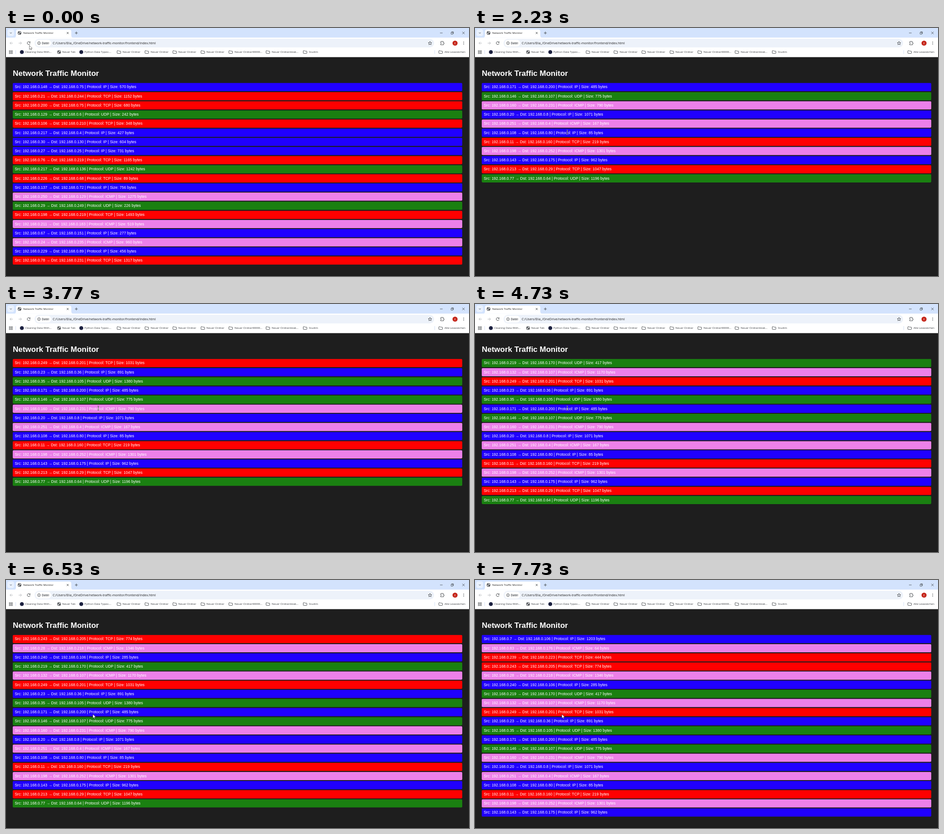
Recreate the animation shown at these times as an HTML page. Size 1021 by 549 pixels, loop 8 s.

```html
<!DOCTYPE html>
<html lang="de">
<head>
<meta charset="utf-8">
<title>Network Traffic Monitor</title>
<style>
html, body { margin: 0; width: 100%; height: 100%; overflow: hidden; background: #1e1e1e; }
#stage { position: relative; width: 1021px; height: 549px; overflow: hidden; background: #1e1e1e; }
#stage > svg { position: absolute; left: 0; top: 0; }
#page {
  position: absolute; left: 0; top: 0; width: 1920px; height: 1033px;
  transform: scale(.53177); transform-origin: 0 0;
  font: 16px/18px "Liberation Sans", Arial, sans-serif; color: #fff;
}
h1 { position: absolute; left: 28px; top: 169.5px; margin: 0; font-size: 32px; line-height: 37px; white-space: nowrap; }
#list { position: absolute; left: 28px; top: 229.4px; width: 1864px; }
#list div { height: 18px; padding: 8px; margin-bottom: 4px; border-radius: 4px; white-space: pre; }
.IP { background: #2000ff; }
.TCP { background: #f00; }
.UDP { background: #1a8011; }
.ICMP { background: #ec80e9; }
#edge { position: absolute; left: 0; top: 547px; width: 100%; height: 2px; background: #181818; }
#ui { font: 6.05px "Open Sans", "Noto Sans", sans-serif; }
#ui text { fill: #3c3f43; white-space: pre; }
.line { fill: none; stroke: #3c4043; stroke-width: .9; }
#beam { mix-blend-mode: difference; }
</style>
</head>
<body>
<div id="stage">
  <div id="page">
    <h1>Network Traffic Monitor</h1>
    <div id="list"></div>
  </div>
  <div id="edge"></div>

  <svg id="ui" width="1021" height="549" viewBox="0 0 1021 549">
    <defs>
      <g id="folder" class="line"><path d="M.5-2.2q0-.8.8-.8H3.4l1 1H7.700q.8 0 .8.8V2.300q0 .8-.8.8H1.300q-.8 0-.8-.8Z"/></g>
      <g id="globe">
        <circle r="4" fill="#4a4d51"/>
        <path d="M-3-.8Q-1.500-.7-1 .5T.5 1.500V3Q-2.700 3-3-.8M-.5-3Q2.500-3.200 3-.3 1.500.2.800-.8T-.8-1.500Z" fill="#fff"/>
      </g>
    </defs>

    <!-- tab strip -->
    <path d="M0 0H1021V22H0Z" fill="#d3e3fd"/>
    <rect x="3" y="3" width="15" height="15" rx="4.500" fill="#e9f1fe"/>
    <path class="line" d="M8.700 10l2 2 2-2"/>
    <path d="M17 21.500q5 0 5-5V8q0-4.500 4.500-4.500h113q4.500 0 4.500 4.500v8.500q0 5 5 5Z" fill="#fff"/>
    <use href="#globe" x="29.800" y="11"/>
    <text x="38" y="13.200" style="font-size:6px;fill:#1f1f1f">Network Traffic Monitor</text>
    <path class="line" d="M134 9l4.200 4.200M138.200 9L134 13.200M152 11h6.200M155.100 7.900v6.200"/>
    <path class="line" d="M957 11h5.800M1006.200 8.300l5.200 5.200M1011.400 8.300l-5.200 5.200" style="stroke-width:.8"/>
    <path class="line" d="M981.500 9.700h3.900v3.900h-3.900ZM982.800 9.500V8.400h3.900v3.900h-1.100" style="stroke-width:.8"/>

    <!-- toolbar -->
    <path d="M0 21.300H1021V64.500H0Z" fill="#fff"/>
    <g class="line">
      <path d="M15.200 33.500H8.800M11.800 30.400l-3.100 3.100 3.100 3.100M27.800 33.500h6.400M31.200 30.400l3.100 3.100-3.100 3.100" stroke="#b4b7ba" style="stroke:#b4b7ba"/>
      <path d="M52.800 31.700A3.200 3.200 0 1 0 53.200 34.200M53.200 29.900v2.300h-2.300" style="stroke-width:1"/>
    </g>
    <rect x="63" y="24" width="881" height="19" rx="9.500" fill="#edf2fa"/>
    <rect x="65.500" y="26" width="34" height="15" rx="7.500" fill="#fff"/>
    <circle class="line" cx="72.700" cy="33.500" r="3.100"/>
    <path class="line" d="M72.700 33.200v2M72.700 31.500v.8"/>
    <text x="79" y="35.700" style="font-size:6.200px;font-weight:600">Datei</text>
    <text x="103" y="36" style="font-size:7.050px;fill:#1f1f1f">C:/Users/Elia_/OneDrive/network-traffic-monitor/frontend/index.html</text>
    <path class="line" d="M935 29.700l1.100 2.600 2.800.2-2.100 1.900.6 2.700-2.400-1.500-2.400 1.500.6-2.700-2.100-1.900 2.800-.2Z"/>
    <path class="line" d="M958.500 30.500h2q-.2-1.500 1-1.500t1 1.500h2.400v2.400q1.500-.2 1.500 1t-1.500 1v2.300h-6.400v-2.200q1.500-.2 1.500-1.200t-1.500-1.200Z"/>
    <circle cx="990.200" cy="33.500" r="5.600" fill="#c5271c"/>
    <text x="990.200" y="35.500" text-anchor="middle" style="font-size:5.400px;fill:#fff">E</text>
    <g fill="#3c4043"><circle cx="1009.300" cy="30.700" r=".8"/><circle cx="1009.300" cy="33.500" r=".8"/><circle cx="1009.300" cy="36.300" r=".8"/></g>

    <!-- bookmarks -->
    <path class="line" d="M7.200 50h2.600v2.600H7.200ZM11.600 50h2.600v2.600h-2.600ZM7.200 54.200h2.600v2.600H7.200ZM11.600 54.200h2.600v2.600h-2.600Z" style="stroke-width:.8"/>
    <path d="M21.300 49v8.500M945.500 49v8.500" stroke="#c7d7f2" stroke-width=".8"/>
    <g id="marks"></g>
  </svg>

  <svg id="beam" width="1021" height="549" viewBox="0 0 1021 549">
    <path d="M-1.700-4.500H-.5L0-4.200.5-4.500H1.700M0-4.200V4.200M-1.700 4.500H-.5L0 4.200.5 4.500H1.700" fill="none" stroke="#ddd" stroke-width=".75"/>
  </svg>
  <svg id="arrow" width="1021" height="549" viewBox="0 0 1021 549">
    <path d="M0 0V9L2.100 7.100 3.500 10.200 4.900 9.600 3.500 6.600H6.400Z" fill="#fff" stroke="#111" stroke-width=".55"/>
  </svg>
</div>

<script>
const $ = id => document.getElementById(id);
const LOOP = 8000, MAX_ROWS = 20;

// icon, icon x, text x, label
const marks = [
  ['dot', 35, 42, 'Cleaning Data With...'],
  ['globe', 117, 124, 'Neuer Tab'],
  ['dot', 166, 173, 'Python Data Types:...'],
  ['folder', 244.5, 257, 'Neuer Ordner'],
  ['folder', 306, 319, 'Neuer Ordner'],
  ['folder', 367.5, 380, 'Neuer Ordner'],
  ['folder', 429.5, 442, 'Neuer Ordner'],
  ['folder', 491, 504, 'Neuer Ordnerlllllllllll...'],
  ['folder', 573, 586, 'Neuer Ordnerdslak...'],
  ['folder', 655, 668, 'Studim'],
  ['folder', 954, 967, 'Alle Lesezeichen']
];
$('marks').innerHTML = marks.map(([icon, x, tx, label]) =>
  (icon === 'dot'
    ? `<circle cx="${x}" cy="53.2" r="4.3" fill="#1c2140"/>`
    : `<use href="#${icon}" x="${x}" y="53.2"/>`) +
  `<text x="${tx}" y="55.4">${label}</text>`).join('');

// packets as "src dst protocol size"
const parse = s => s.split(',').map(p => {
  const [src, dst, proto, size] = p.trim().split(' ');
  return `<div class="${proto}">Src: 192.168.0.${src} → Dst: 192.168.0.${dst} | Protocol: ${proto} | Size: ${size} bytes</div>`;
});

// newest first
const before = parse(`148 75 IP 570, 21 244 TCP 1152, 200 75 TCP 680, 129 6 UDP 242,
  106 210 TCP 348, 217 4 IP 427, 30 130 IP 604, 27 25 IP 731, 76 219 TCP 1165,
  217 136 UDP 1242, 226 68 TCP 89, 137 72 IP 756, 250 129 ICMP 1275, 29 249 UDP 226,
  198 219 TCP 1493, 211 183 ICMP 519, 67 151 IP 277, 24 235 ICMP 960, 229 89 IP 456,
  78 231 TCP 1317`);
const after = parse(`7 106 IP 1203, 83 176 ICMP 64, 239 223 TCP 444, 243 205 TCP 774,
  28 218 ICMP 1346, 240 106 IP 285, 219 170 UDP 417, 132 107 ICMP 1170, 249 201 TCP 1031,
  23 36 IP 891, 35 105 UDP 1380, 171 200 IP 485, 146 107 UDP 775, 160 231 ICMP 790,
  20 8 IP 1071, 251 4 ICMP 167, 108 80 IP 85, 11 160 TCP 219, 198 252 ICMP 1301,
  143 175 IP 962, 213 29 TCP 1047, 77 64 UDP 1196`);

const CLEAR = 700, RECONNECT = 830, BACKLOG = 8;
const arrivals = [1230, 1730, 2230, 2700, 3200, 3770, 4230, 4730, 5230, 5730, 6230, 6770, 7270, 7730];

// -1 stands for the list before the reload
function rowCount(t) {
  if (t < CLEAR) return -1;
  if (t < RECONNECT) return 0;
  return BACKLOG + arrivals.filter(a => a <= t).length;
}

// time, x, y
const path = [
  [0, 51.5, 38.5], [30, 51.5, 38.5], [200, 47, 35], [730, 47, 35], [1170, 174, 238.7],
  [1500, 196, 236], [1970, 203.5, 230.5], [5130, 203.5, 230.5], [5930, 197, 270],
  [6500, 191.5, 297], [LOOP, 191.5, 297]
];

function pointer(t) {
  const i = path.findIndex(p => p[0] > t);
  const [t0, x0, y0] = path[i - 1], [t1, x1, y1] = path[i];
  const k = (t - t0) / (t1 - t0), e = k * k * (3 - 2 * k);
  return [x0 + (x1 - x0) * e, y0 + (y1 - y0) * e];
}

let shown;
function draw(t) {
  const n = rowCount(t);
  if (n !== shown) {
    shown = n;
    const rows = n < 0 ? before : after.slice(after.length - n);
    $('list').innerHTML = rows.slice(0, MAX_ROWS).join('');
  }
  const [x, y] = pointer(t), overText = t > 1000 && t < 6000;
  for (const id of ['beam', 'arrow']) {
    $(id).style.visibility = (id === 'beam') === overText ? 'visible' : 'hidden';
    $(id).firstElementChild.setAttribute('transform', `translate(${x} ${y})`);
  }
}

const start = performance.now();
function tick() {
  draw((performance.now() - start) % LOOP);
  requestAnimationFrame(tick);
}
tick();
</script>
</body>
</html>
```
